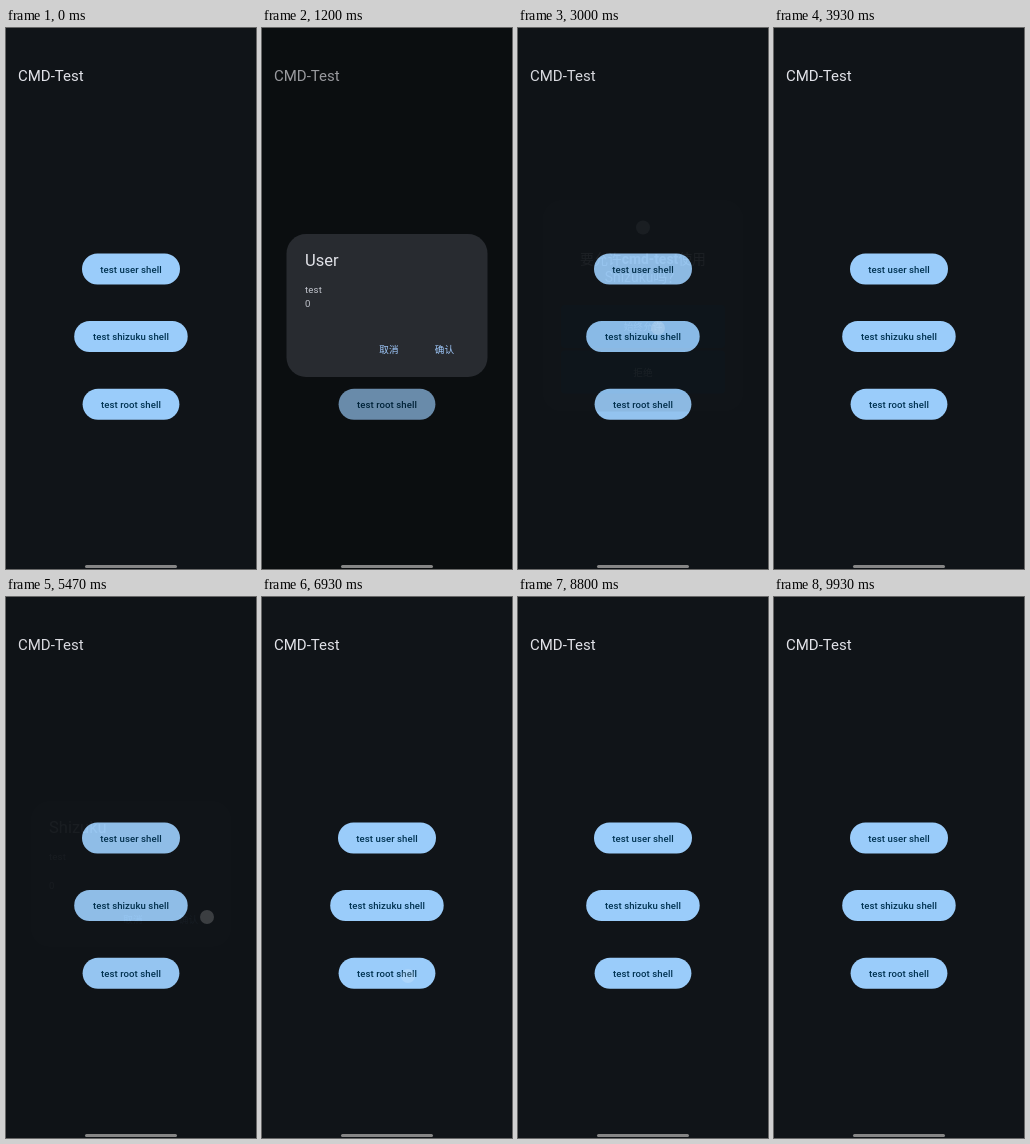
Recreate the animation shown at these times as an HTML page. Size 250 by 541 pixels, loop 10000 ms.

```html
<!DOCTYPE html>
<html lang="zh">
<head>
<meta charset="utf-8">
<title>CMD-Test</title>
<style>
  html, body { margin: 0; width: 100%; height: 100%; overflow: hidden; background: #101418; }
  svg { display: block; width: 250px; height: 541px; }
  text { font-family: Roboto, "Noto Sans CJK SC", "Noto Sans CJK", sans-serif; font-size: 9.6px; fill: #e1e2e8; }
  .mid { text-anchor: middle; }
  .med { font-weight: 500; letter-spacing: .07px; }
  .bold { font-weight: 700; }
  .pill { fill: #9accfa; }
  .ink { fill: #003352; }
  .head { font-size: 16.5px; }
  .body { fill: #c3c6ce; letter-spacing: .15px; }
  .link { fill: #a0cafd; }
  .ask { font-size: 13.9px; }
  .option { fill: #003c62; }
  .light { fill: #c9e6ff; }
  .warn { fill: #e57373; font-size: 9.8px; font-weight: 700; }
</style>
</head>
<body>
<svg id="stage" viewBox="0 0 250 541"></svg>
<script>
const stage = document.getElementById('stage');
const LOOP = 10000, FADE = 150, SCRIM_FADE = 65, TAP = 110;

const text = (x, y, cls, s, extra = '') => `<text x="${x}" y="${y}" class="${cls}" ${extra}>${s}</text>`;
const box = (x, y, w, h, r, attr) => `<rect x="${x}" y="${y}" width="${w}" height="${h}" rx="${r}" ${attr}/>`;

const pill = (x, y, w, label) =>
  box(x, y, w, 31, 15.5, 'class="pill"') + text(125, y + 19, 'med mid ink', label);

// Dialog with the output of a shell command
const result = (title, top = 206, bottom = 349, last = 278.5) =>
  box(24.5, top, 201, bottom - top, 19.5, 'fill="#282b30"') +
  text(43, top + 32, 'head', title) +
  text(43, top + 59, 'body', 'test') +
  text(43, last, 'body', '0') +
  text(127, bottom - 24.5, 'med mid link', '取消') +
  text(182.5, bottom - 24.5, 'med mid link', '确认');

const permission =
  box(24.5, 172, 201, 211.5, 19.5, 'fill="#24282c"') +
  '<circle cx="125" cy="199.5" r="7" fill="#c1c7ce"/>' +
  text(125, 236, 'ask mid', '要允许<tspan class="bold">cmd-test</tspan>使用') +
  text(125, 254, 'ask mid', 'Shizuku吗？') +
  box(43, 277, 164, 43, 4, 'class="option"') +
  box(43, 322.5, 164, 43, 4, 'class="option"') +
  text(125, 301.5, 'med mid light', '始终允许') +
  text(125, 347.5, 'med mid light', '拒绝');

const superuser =
  box(0, 173, 250, 209.5, 5, 'fill="#242427"') +
  text(125, 200, 'bold mid', '超级用户请求', 'style="font-size:14px"') +
  '<circle cx="45" cy="234" r="15" fill="#7cb342"/>' +
  text(76, 232.7, 'bold', 'cmd-test') +
  text(76, 243, '', 'com.zeli.cmd.android', 'style="font-size:8.3px;fill:#929296"') +
  text(90, 281, '', '永久', 'style="font-size:8px;fill:#c4c4c6"') +
  '<path d="M143.5 276h9l-4.5 4.3z" fill="#d0d0d2"/>' +
  text(125, 318, 'warn mid', '将授予对该设备的最高权限。') +
  text(125, 331, 'warn mid', '如果不确定，请拒绝！') +
  text(56, 368, 'med', '', 'id="deny" style="fill:#aaaaad;letter-spacing:.8px"') +
  text(165, 368, 'bold', '允许', 'style="fill:#48a9ea;letter-spacing:.8px"');

// Times in ms, strength of the scrim, content
const dialogs = [
  { open: 560, close: 1610, dim: .32, art: result('User') },
  { open: 2276, close: 3010, dim: .32, art: permission },
  { open: 4300, close: 5478, dim: .32, art: result('Shizuku', 204, 350, 291.5) },
  { open: 7000, close: 8620, dim: .62, art: superuser },
  { open: 8850, close: 9510, dim: .32, art: result('Root') }
];

// Start time and place of each touch
const taps = [
  [430, 146, 243], [1520, 201, 320], [2150, 146, 311], [2900, 140, 300],
  [4160, 146, 311], [5390, 201, 320], [6930, 146, 379], [8520, 180, 365], [9420, 201, 320]
];

stage.innerHTML =
  box(0, 0, 250, 541, 0, 'fill="#101418"') +
  text(12, 53.3, '', 'CMD-Test', 'style="font-size:15px"') +
  pill(76, 225.5, 98, 'test user shell') +
  pill(68.2, 293, 113.5, 'test shizuku shell') +
  pill(76.6, 360.8, 96.8, 'test root shell') +
  box(0, 0, 250, 541, 0, 'id="scrim"') +
  dialogs.map(d => `<g class="dialog">${d.art}</g>`).join('') +
  '<circle id="touch" r="7" fill="#fff" opacity="0"/>' +
  box(79, 537, 92, 3, 1.5, 'fill="#868686"');

const [scrim, touch, deny] = ['scrim', 'touch', 'deny'].map(id => document.getElementById(id));
const layers = stage.querySelectorAll('.dialog');

const ramp = (t, d, span) => Math.max(0, Math.min(1, (t - d.open) / span, (d.close - t) / span));

function draw(now) {
  const t = now % LOOP;
  let dim = 0;
  dialogs.forEach((d, i) => {
    layers[i].setAttribute('opacity', ramp(t, d, FADE));
    dim = Math.max(dim, d.dim * ramp(t, d, SCRIM_FADE));
  });
  scrim.setAttribute('opacity', dim);
  deny.textContent = `拒绝 (${t < 8000 ? 10 : 9})`;

  const tap = taps.find(([at]) => t >= at && t < at + TAP);
  touch.setAttribute('opacity', tap ? .18 : 0);
  if (tap) {
    touch.setAttribute('cx', tap[1]);
    touch.setAttribute('cy', tap[2]);
  }
  requestAnimationFrame(draw);
}
draw(performance.now());
</script>
</body>
</html>
```
